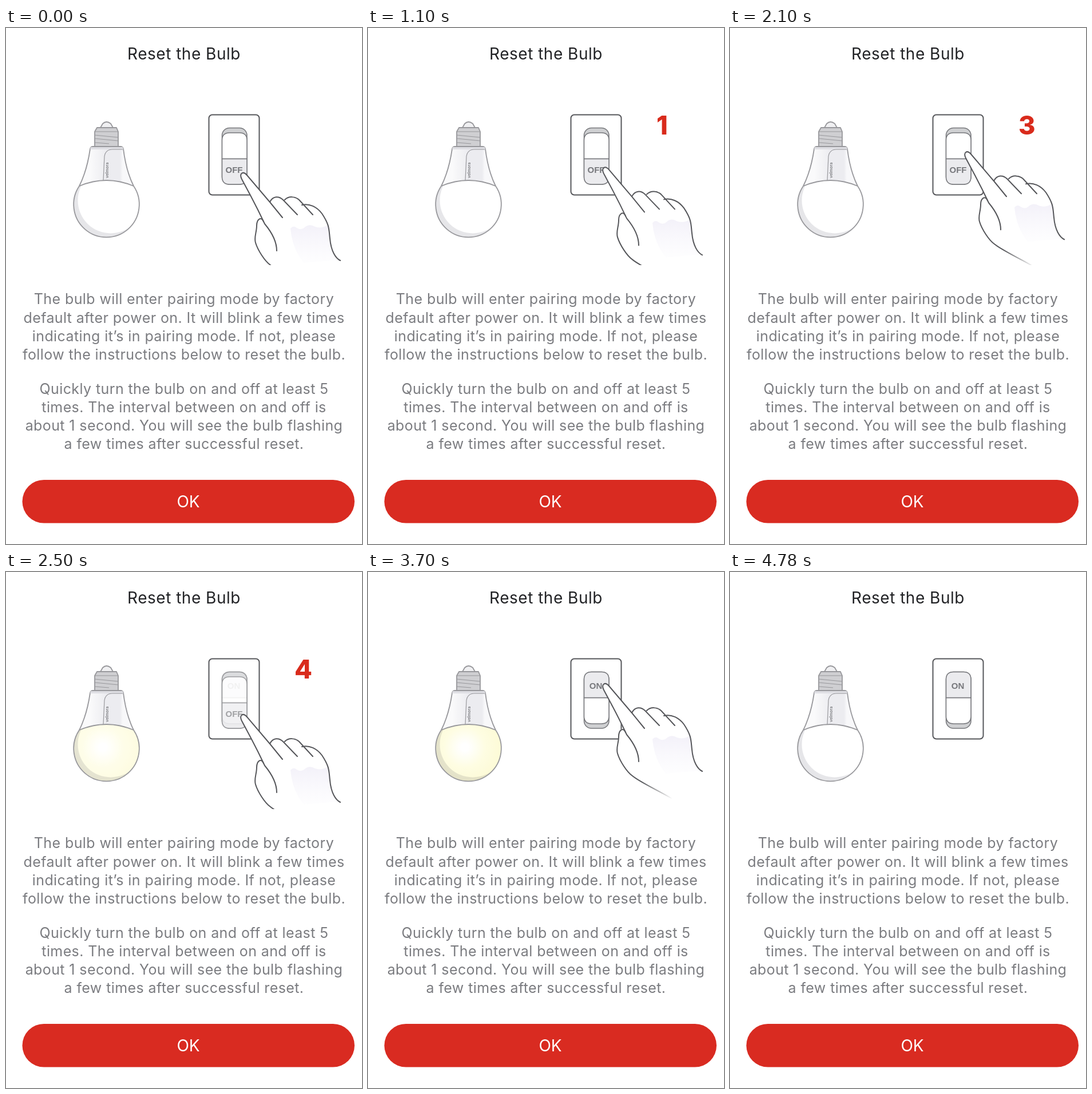
Animation of 622x901 px, one loop 4960 ms. Source, as an HTML page:

```html
<!DOCTYPE html>
<html lang="en">
<head>
<meta charset="utf-8">
<title>Reset the Bulb</title>
<style>
  html, body { margin: 0; width: 100%; height: 100%; overflow: hidden; background: #fff; }
  svg { display: block; width: 622px; height: 901px; }
  text { font-family: Inter, Roboto, sans-serif; text-anchor: middle; }
  .body { font-size: 25px; letter-spacing: .4px; fill: #7b7c80; }
  .label { font: bold 15px "Liberation Sans", Arial, sans-serif; fill: #77787c; }
  .line { fill: none; stroke: #55565a; stroke-width: 2; stroke-linecap: round; stroke-linejoin: round; }
  .rim { stroke: #98989c; stroke-width: 1.8; stroke-linejoin: round; }
  .thin { fill: none; stroke: #98989c; stroke-width: 1.2; }
  .key { stroke: #77787c; stroke-width: 1.5; }
</style>
</head>
<body>
<svg viewBox="0 0 622 901">
  <defs>
    <radialGradient id="glow" gradientUnits="userSpaceOnUse" cx="169" cy="306" r="64">
      <stop offset=".1" stop-color="#fff"/>
      <stop offset=".55" stop-color="#fdfbcf"/>
      <stop offset="1" stop-color="#fbf8bb"/>
    </radialGradient>
    <linearGradient id="neck">
      <stop offset=".2" stop-color="#fafafb"/>
      <stop offset=".5" stop-color="#ececf0"/>
      <stop offset=".75" stop-color="#ececf0"/>
      <stop offset=".8" stop-color="#f8f8fa"/>
    </linearGradient>
    <linearGradient id="palm" x2="0" y2="1">
      <stop offset="0" stop-color="#f3f1f9"/>
      <stop offset="1" stop-color="#f8f7fc" stop-opacity=".2"/>
    </linearGradient>
    <linearGradient id="fade" gradientUnits="userSpaceOnUse" x1="478" x2="532" y1="0" y2="0">
      <stop offset="0" stop-color="#55565a"/>
      <stop offset="1" stop-color="#55565a" stop-opacity="0"/>
    </linearGradient>
    <path id="globe" d="M128 276A57.3 57.3 0 1 0 223 276Q175.5 256 128 276Z"/>
    <clipPath id="inGlobe"><use href="#globe"/></clipPath>
    <clipPath id="stage"><path d="M340 140H586V414H340Z"/></clipPath>
  </defs>

  <text x="311" y="54.5" font-size="28" letter-spacing=".5" fill="#222326">Reset the Bulb</text>

  <g id="bulb">
    <path class="rim" fill="#f0f0f2" d="M165 174L169 167Q175.5 161 183 167L187 174Z"/>
    <path class="rim" fill="#cfcfd2" d="M159 174H193L196 181V207H155V181Z"/>
    <path class="thin" d="M155 181H196M155 187L196 191M155 193L196 197M155 200L180 202"/>
    <path class="rim" fill="url(#neck)" d="M128 276C138 256 144 232 147 211Q148 207 152 207H200Q204 207 205 211C208 235 214 258 223 276Z"/>
    <path fill="#dfdfe4" d="M148 208H204L205 212H147Z"/>
    <path class="thin" d="M170 266L172 224Q174 212 186 212H204"/>
    <text transform="translate(179 262) rotate(-90)" style="text-anchor:start;font-size:7px;font-weight:600" fill="#77787c">velmora</text>
    <use href="#globe" fill="#e6e6e9"/>
    <circle cx="183" cy="301" r="57.5" fill="#fff" clip-path="url(#inGlobe)"/>
    <use id="light" href="#globe" fill="url(#glow)" style="mix-blend-mode:multiply"/>
    <use href="#globe" fill="none" class="rim"/>
  </g>

  <rect class="line" x="354.5" y="151.5" width="88" height="140" rx="6"/>
  <g id="on">
    <rect class="key" x="377.5" y="174.5" width="43.5" height="98.5" rx="13" fill="#cfd0d2"/>
    <path class="key" fill="#fff" d="M377.5 219.5H421V252Q421 265 408 265H390.500Q377.500 265 377.500 252Z"/>
    <path class="key" fill="#ebebee" d="M377.5 219.5V187.5Q377.5 174.5 390.5 174.5H408Q421 174.5 421 187.500V219.500Z"/>
    <text class="label" x="398" y="204">ON</text>
  </g>
  <g id="off">
    <rect class="key" x="377.5" y="174.5" width="43.5" height="98.5" rx="13" fill="#cfd0d2"/>
    <path class="key" fill="#fff" d="M377.5 228.5V196Q377.5 183 390.5 183H408Q421 183 421 196V228.5Z"/>
    <path class="key" fill="#ebebee" d="M377.5 228.5H421V260Q421 273 408 273H390.5Q377.5 273 377.5 260Z"/>
    <text class="label" x="398.5" y="252.500">OFF</text>
  </g>

  <g clip-path="url(#stage)"><g id="hand">
    <path fill="#fff" d="M412 264C407 254 414 249 421 257L461 304C466 293 477 293 484 300C494 293 505 294 517 309C530 306 543 312 552 324C566 345 564 352 566 368C568 390 576 402 584 406L560 470L500 440L462 414C452 407 440 388 436 375C433 365 438 357 438 345C438 336 442 329 447 333Z"/>
    <path fill="url(#palm)" d="M497 350Q502 344 508 349Q516 354 522 348Q530 341 540 347Q550 351 563 344L566 368C568 390 574 400 580 405L520 410Q500 385 497 350Z"/>
    <path class="line" d="M473 389C473 372 462 354 452 342C444 325 437 311 428 294L412 264C407 254 414 249 421 257L461 304L483 331
      M461 304C466 293 477 293 484 300L509 326M487 300C494 293 505 294 512 300L536 326
      M517 309C530 306 543 312 552 324C566 345 564 352 566 368C568 390 576 402 584 406"/>
    <path class="line" style="stroke:url(#fade)" d="M450 338C446 328 438 334 438 345C438 357 433 365 436 375C440 388 452 407 462 414C474 424 500 436 530 453"/>
  </g></g>

  <text id="count" x="504" y="186" style="text-anchor:start;font-size:45px;font-weight:800" fill="#d92b1c"></text>

  <g class="body">
    <text x="311" y="482">The bulb will enter pairing mode by factory</text>
    <text x="311" y="514.500">default after power on. It will blink a few times</text>
    <text x="311" y="546.500">indicating it’s in pairing mode. If not, please</text>
    <text x="311" y="578.500">follow the instructions below to reset the bulb.</text>
    <text x="311" y="638.500">Quickly turn the bulb on and off at least 5</text>
    <text x="311" y="671">times. The interval between on and off is</text>
    <text x="311" y="703">about 1 second. You will see the bulb flashing</text>
    <text x="311" y="734.500">a few times after successful reset.</text>
  </g>

  <rect x="28.5" y="789" width="580.5" height="75.500" rx="37.75" fill="#d92b21"/>
  <text x="318.500" y="836.500" font-size="28" fill="#fff">OK</text>
</svg>
<script>
const LOOP = 4960, TOP = -58, REST = -4;
const ons = [550, 1280, 1760, 2230, 2860, 3580];
const offs = [1020, 1460, 2000, 2470, 3240];
const blink = [[3580, 0], [3780, 1], [3850, 1], [4000, 0], [4200, 0], [4400, 1], [4640, 0]];

const $ = id => document.getElementById(id);
const ramp = (t, start, length) => Math.min(1, Math.max(0, (t - start) / length));
const smooth = x => x * x * (3 - 2 * x);

function along(keys, t, ease = x => x) {
  let [t0, v0] = keys[0];
  for (const [t1, v1] of keys) {
    if (t < t1) return v0 + (v1 - v0) * ease(ramp(t, t0, t1 - t0));
    [t0, v0] = [t1, v1];
  }
  return v0;
}

// The finger rests around each press and travels in between.
const path = [[0, 0], [60, REST]];
ons.forEach((on, i) => {
  path.push([on - 100, TOP], [on + 60, TOP]);
  if (i < offs.length) path.push([offs[i] - 80, REST], [offs[i] + 60, REST]);
});

function draw(t) {
  const presses = ons.filter(on => t >= on).length;
  let power = 0, light = 0;
  ons.forEach((on, i) => {
    const off = offs[i] ?? Infinity;
    power += ramp(t, on - 80, 160) - ramp(t, off - 80, 160);
    light = Math.max(light, ramp(t, on, 200) * (1 - ramp(t, off - 30, 110)));
  });
  if (t >= blink[0][0]) light = along(blink, t);

  $("hand").setAttribute("transform", `translate(0 ${along(path, t, smooth)})`);
  $("hand").setAttribute("opacity", 1 - ramp(t, 3700, 200));
  $("on").setAttribute("opacity", power);
  $("off").setAttribute("opacity", 1 - power);
  $("light").setAttribute("opacity", light);
  $("count").textContent = presses > 0 && presses < 6 ? presses : "";
}

const start = performance.now();
function tick() {
  const t = (performance.now() - start) % LOOP;
  draw(t >= 4780 ? 4780 : Math.min(4600, Math.floor(t / 100) * 100));
  requestAnimationFrame(tick);
}
tick();
</script>
</body>
</html>
```
